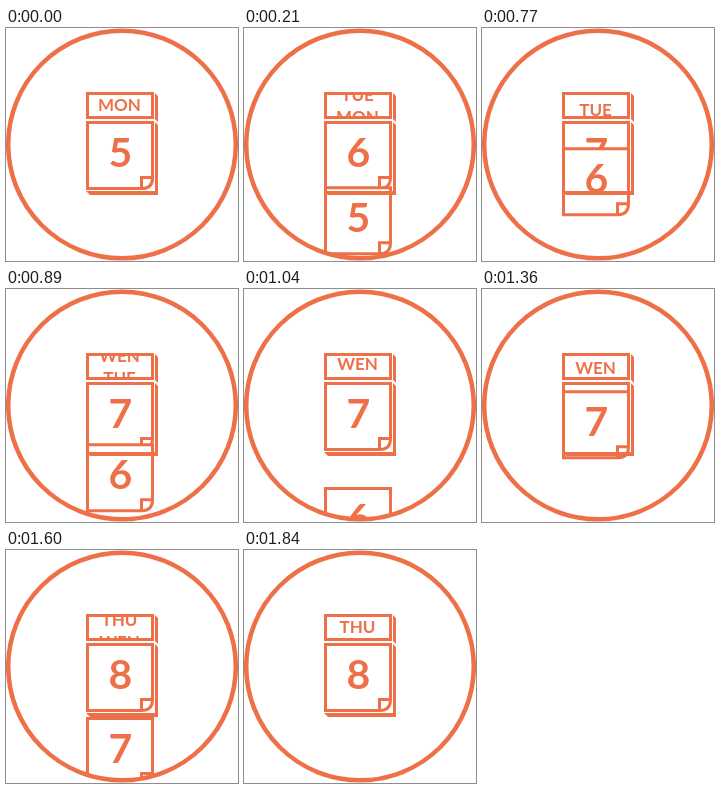
An HTML page that plays this animation: 232 px wide and 233 px high, repeating every 2.01 s.

```html
<!DOCTYPE html>
<html lang="en">
<head>
<meta charset="utf-8">
<title>Tear-off calendar</title>
<style>
html, body { margin: 0; width: 232px; height: 233px; overflow: hidden; background: #fff; }
svg { display: block; }
text { font: bold 17px Lato, sans-serif; fill: #ee7048; stroke: none; text-anchor: middle; }
.digit { font-size: 41px; }
</style>
</head>
<body>
<svg width="232" height="233" fill="none" stroke="#ee7048" stroke-width="3">
  <defs>
    <clipPath id="header"><rect x="83" y="67" width="62" height="21"/></clipPath>
    <clipPath id="disc"><circle cx="116" cy="116.5" r="113"/></clipPath>
    <g id="sheet">
      <path fill="#fff" d="M146.5 150V94.5H81.5V160.5H135.5Q146.5 160.5 146.5 149.5"/>
      <path d="M135.5 160.5V149.5H146.5"/>
    </g>
  </defs>
  <rect x="81.5" y="65.5" width="65" height="24"/>
  <g clip-path="url(#header)">
    <text id="oldDay" x="113.5"/>
    <text id="newDay" x="113.5"/>
  </g>
  <g clip-path="url(#disc)">
    <use href="#sheet"/>
    <text id="newDate" class="digit" x="114.5" y="139"/>
    <g id="falling">
      <use href="#sheet"/>
      <text id="oldDate" class="digit" x="114.5" y="139"/>
    </g>
  </g>
  <path fill="#ee7048" stroke="none" d="M149 65l3 3v26l-3-3zM149 94l3 3v70H84l-4-4H149z"/>
  <circle cx="116" cy="116.5" r="113.8" stroke-width="4.5"/>
</svg>
<script>
const LOOP = 2010, TICK = 30, ROW = 22, DROP = 140, DAY_TICKS = 13;
const days = ["MON", "TUE", "WEN", "THU"];
const flips = [{ start: 0, ticks: 15 }, { start: 680, ticks: 16 }, { start: 1330, ticks: 17 }];
const $ = id => document.getElementById(id);

function draw(now) {
  const t = now % LOOP;
  const i = flips.findLastIndex(f => t >= f.start);
  const { start, ticks } = flips[i];
  const tick = Math.min(Math.floor((t - start) / TICK), ticks);
  const slide = ROW * Math.min(tick / DAY_TICKS, 1);

  $("oldDay").textContent = days[i];
  $("newDay").textContent = days[i + 1];
  $("oldDay").setAttribute("y", 83 + slide);
  $("newDay").setAttribute("y", 83 + slide - ROW);
  $("oldDate").textContent = 5 + i;
  $("newDate").textContent = 6 + i;
  $("falling").setAttribute("transform", `translate(0 ${DROP * tick / ticks})`);
}

const origin = performance.now();
(function frame() {
  draw(performance.now() - origin);
  requestAnimationFrame(frame);
})();
</script>
</body>
</html>
```
